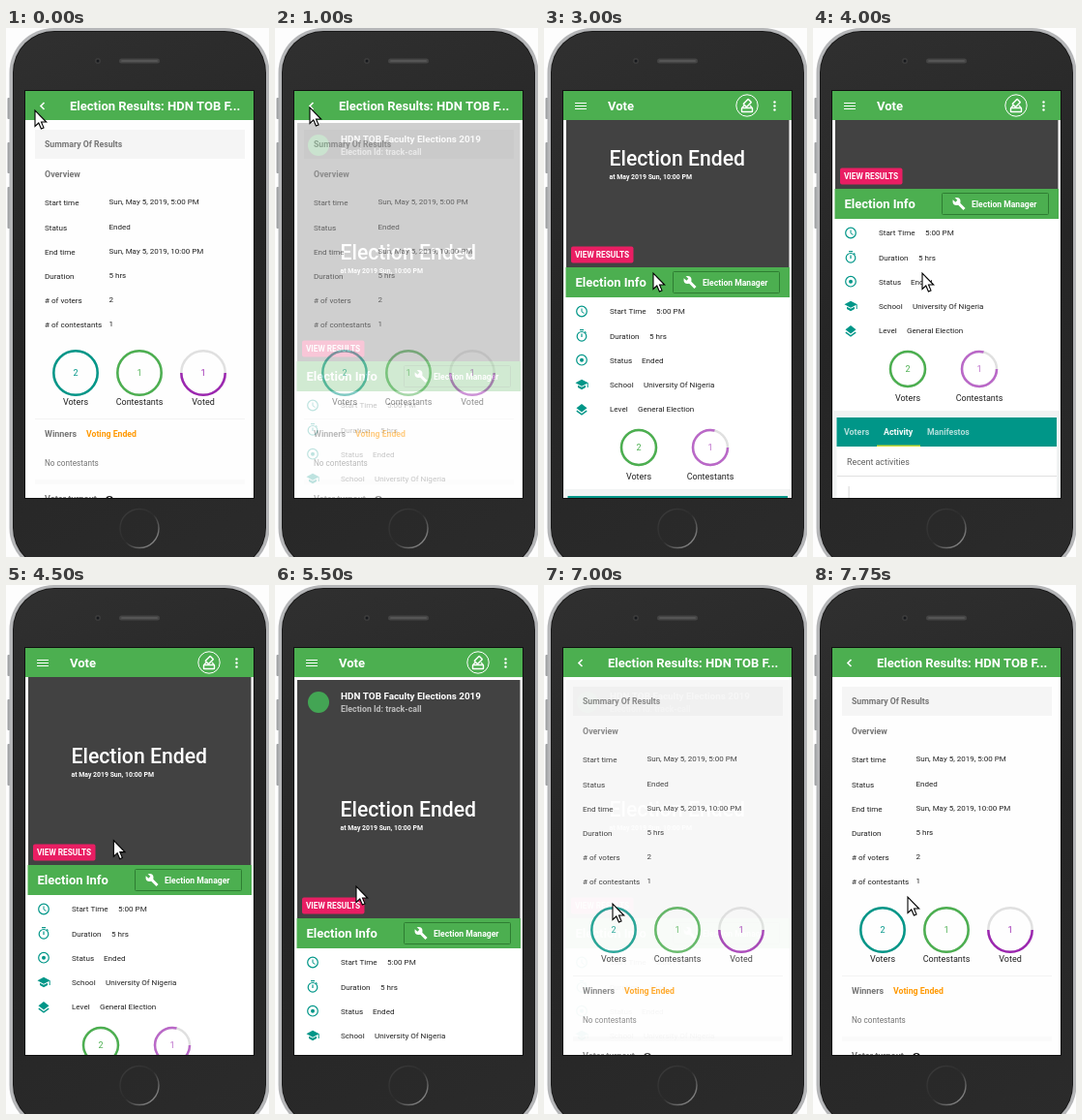
An HTML page with a canvas for the animation above (8 s loop, 272x546 px).

```html
<!DOCTYPE html>
<html lang="en">
<head>
<meta charset="utf-8">
<title>Election app</title>
<style>
  html, body { margin: 0; width: 100%; height: 100%; overflow: hidden; background: #fdfdfd; }
  canvas { display: block; width: 272px; height: 546px; }
</style>
</head>
<body>
<canvas id="stage"></canvas>
<script>
const W = 272, H = 546, LOOP = 8000, STEP = 250;
const GREEN = '#4caf50', TEAL = '#009688', GREY = '#757575', INK = '#212121';
const EVENT = 'HDN TOB Faculty Elections 2019';

const canvas = document.getElementById('stage');
const ctx = canvas.getContext('2d');
const ratio = window.devicePixelRatio || 1;
canvas.width = W * ratio;
canvas.height = H * ratio;

// Holds a copy of the page that is being faded out.
const under = document.createElement('canvas');
under.width = canvas.width;
under.height = canvas.height;

// Keyframes: [time, value, ...]
const CURSOR = [
  [0, 30, 85], [250, 33, 84], [500, 36, 82], [1000, 36, 82], [1250, 48, 130], [1500, 75, 210],
  [1750, 102, 282], [2000, 112, 301], [2500, 112, 301], [2750, 113, 262], [3000, 113, 253],
  [4250, 113, 253], [5000, 108, 285], [5500, 84, 311], [5750, 73, 325], [6000, 64, 333],
  [6500, 64, 333], [7000, 71, 329], [7250, 82, 326], [7750, 98, 322], [8000, 98, 322]
];
const SCROLL = [[0, 0], [2500, 0], [2750, 45], [3000, 97], [3250, 138], [3500, 166],
  [3750, 178], [4000, 178], [4250, 125], [4500, 55], [4750, 0], [8000, 0]];
const RESULTS = [[0, 1], [750, 1], [1000, 0.5], [1250, 0], [6500, 0], [6750, 0.4],
  [7000, 0.82], [7250, 1], [8000, 1]];

function track(keys, t) {
  const next = Math.max(1, keys.findIndex(k => k[0] >= t));
  const a = keys[next - 1], b = keys[next];
  const p = (t - a[0]) / (b[0] - a[0]);
  return a.slice(1).map((v, i) => v + (b[i + 1] - v) * p);
}

function rect(x, y, w, h, fill, radius = 0) {
  ctx.beginPath();
  ctx.roundRect(x, y, w, h, radius);
  ctx.fillStyle = fill;
  ctx.fill();
}

function outline(x, y, w, h, color, radius = 0, width = 1) {
  ctx.beginPath();
  ctx.roundRect(x, y, w, h, radius);
  ctx.strokeStyle = color;
  ctx.lineWidth = width;
  ctx.stroke();
}

function dot(x, y, r, fill) {
  ctx.beginPath();
  ctx.arc(x, y, r, 0, Math.PI * 2);
  ctx.fillStyle = fill;
  ctx.fill();
}

// Angles are in turns, clockwise from three o'clock.
function arc(x, y, r, color, width, from = 0, to = 1) {
  ctx.beginPath();
  ctx.arc(x, y, r, from * Math.PI * 2, to * Math.PI * 2);
  ctx.strokeStyle = color;
  ctx.lineWidth = width;
  ctx.stroke();
}

function line(points, color, width = 1) {
  ctx.beginPath();
  points.forEach(([x, y]) => ctx.lineTo(x, y));
  ctx.strokeStyle = color;
  ctx.lineWidth = width;
  ctx.stroke();
}

function shape(points, fill) {
  ctx.beginPath();
  points.forEach(([x, y]) => ctx.lineTo(x, y));
  ctx.closePath();
  ctx.fillStyle = fill;
  ctx.fill();
}

// y is the middle of the capital letters.
function text(str, x, y, size, color = INK, weight = 400, align = 'left') {
  ctx.font = `${weight} ${size}px Roboto, sans-serif`;
  ctx.textAlign = align;
  ctx.fillStyle = color;
  ctx.fillText(str, x, y + size * 0.36);
}

function ring(x, y, r, color, value, label, labelY, from = 0, to = 1) {
  arc(x, y, r, '#e0e0e0', 2.5);
  arc(x, y, r, color, 2.5, from, to);
  text(value, x, y, 9, color, 400, 'center');
  text(label, x, labelY, 9, INK, 400, 'center');
}

function drawPhone() {
  rect(0, 0, W, H, '#fdfdfd');
  [[72, 22], [118, 32], [164, 43]].forEach(([y, h]) => rect(1.5, y, 4, h, '#a0a2a4', 1));
  rect(3.5, 0, 269, 562, '#b4b5b7', 46);
  rect(7, 3, 262, 556, '#191919', 43);
  const body = ctx.createLinearGradient(0, 0, W, H);
  body.addColorStop(0, '#303030');
  body.addColorStop(0.5, '#252525');
  body.addColorStop(1, '#2b2b2b');
  rect(8, 4, 260, 554, body, 42);
  dot(95, 34, 3, '#3c3c3c');
  dot(95, 34, 1.5, '#16181c');
  rect(117, 31.5, 42, 5, '#454545', 2.5);
  rect(119, 33, 38, 2, '#555555', 1);
  const rim = ctx.createLinearGradient(120, 498, 156, 535);
  rim.addColorStop(0, '#3c3c3c');
  rim.addColorStop(0.5, '#2c2c2c');
  rim.addColorStop(1, '#999999');
  arc(138, 516.5, 20, rim, 1.4);
  rect(19, 64, 238, 422, '#111111');
}

function drawBar(title) {
  rect(20, 65, 236, 30, GREEN);
  text(title, 66, 80.5, 13, '#ffffff', 700);
}

function drawResultsBar() {
  drawBar(`Election Results: ${EVENT.slice(0, 9)}...`);
  line([[39.5, 77], [36, 80.5], [39.5, 84]], '#ffffff', 1.6);
}

function drawResults() {
  rect(20, 65, 236, 420, '#fefefe');
  drawResultsBar();
  rect(30, 105, 217, 30, '#f5f5f5');
  text('Summary Of Results', 40, 120, 8.7, GREY, 700);
  text('Overview', 40, 151, 8.9, GREY, 700);

  [['Start time', 'Sun, May 5, 2019, 5:00 PM'], ['Status', 'Ended'],
   ['End time', 'Sun, May 5, 2019, 10:00 PM'], ['Duration', '5 hrs'],
   ['# of voters', '2'], ['# of contestants', '1']].forEach(([label, value], i) => {
    const y = 180.5 + i * 25.2;
    text(label, 40, y, 8.1);
    text(value, 106.5, y - 1, 8);
  });

  ring(72, 356, 22.7, TEAL, '2', 'Voters', 386);
  ring(138, 356, 22.7, GREEN, '1', 'Contestants', 386);
  ring(204, 356, 22.7, '#9c27b0', '1', 'Voted', 386, 0, 0.5);

  line([[30, 403.5], [247, 403.5]], '#f3f3f3');
  text('Winners', 40, 419, 9, GREY, 700);
  text('Voting Ended', 83, 419, 8.7, '#ff9800', 700);
  text('No contestants', 40, 449.5, 8.2, GREY);
  rect(30, 466, 217, 5, '#fafafa');
  text('Voter turnout', 40, 486, 9, GREY, 700);
  dot(107, 487, 4, '#111111');
  text('?', 107, 486.5, 7, '#ffffff', 700, 'center');
}

const rowIcons = [
  y => {
    arc(39, y, 5.3, TEAL, 1.2);
    line([[39, y - 3], [39, y + 0.3], [41.5, y + 2]], TEAL);
  },
  y => {
    arc(39, y + 0.7, 4.8, TEAL, 1.2);
    line([[39, y - 2], [39, y + 1.3]], TEAL, 1.2);
    line([[37, y - 6], [41, y - 6]], TEAL, 1.2);
    line([[42.2, y - 4.2], [43.5, y - 3]], TEAL, 1.2);
  },
  y => {
    arc(39, y, 5.3, TEAL, 1.2);
    dot(39, y, 2, TEAL);
  },
  y => {
    shape([[32.5, y - 1.5], [39, y - 5], [45.7, y - 1.5], [39, y + 2]], TEAL);
    shape([[35, y + 1], [39, y + 3], [43, y + 1], [43, y + 3.2], [39, y + 5.4], [35, y + 3.2]], TEAL);
    line([[45.2, y - 1.5], [45.2, y + 3.2]], TEAL);
  },
  y => {
    shape([[33.5, y - 0.6], [39, y - 4.8], [44.5, y - 0.6], [39, y + 3.6]], TEAL);
    line([[33.8, y + 2.2], [39, y + 6], [44.2, y + 2.2]], TEAL, 1.4);
  }
];

function drawWrench(x, y) {
  line([[x - 1, y - 1], [x + 5.5, y + 5.5]], '#ffffff', 3);
  dot(x - 2.5, y - 2.5, 4, '#ffffff');
  shape([[x - 7, y - 5], [x - 5, y - 7], [x - 1.7, y - 3.7], [x - 3.7, y - 1.7]], GREEN);
}

function drawVoteContent() {
  rect(21, 96, 234, 477, '#ffffff');
  rect(23, 98, 230.5, 246, '#424242');
  dot(45, 121, 11, '#43a554');
  text(EVENT, 68, 114, 9.9, '#ffffff', 700);
  text('Election Id: track-call', 68, 128, 8.8, '#bdbdbd', 700);
  text('Election Ended', 67.5, 231, 21.2, '#ffffff', 500);
  text('at May 2019 Sun, 10:00 PM', 67.5, 251, 6.9, '#ffffff', 700);
  rect(28, 322.5, 64.5, 17, '#e91e63', 2);
  text('VIEW RESULTS', 60, 331.2, 8.3, '#ffffff', 700, 'center');

  rect(22.5, 344, 231.5, 31, GREEN);
  text('Election Info', 32.5, 359.5, 13, '#ffffff', 700);
  outline(133.5, 348.5, 110, 22, '#2e7d32', 1);
  drawWrench(151, 359.5);
  text('Election Manager', 164, 360, 8.6, '#ffffff', 700);

  [['Start Time', '5:00 PM', 116], ['Duration', '5 hrs', 109], ['Status', 'Ended', 101],
   ['School', 'University Of Nigeria', 103], ['Level', 'General Election', 97]]
    .forEach(([label, value, x], i) => {
      const y = 389.5 + i * 25.1;
      rowIcons[i](y);
      text(label, 68, y, 8.1);
      text(value, x, y, 8.1);
    });

  ring(98, 530, 18, GREEN, '2', 'Voters', 560);
  ring(172, 530, 18, '#ba68c8', '1', 'Contestants', 560, 0, 0.79);

  rect(24.5, 580, 227.5, 200, '#ffffff');
  rect(24.5, 580, 227.5, 30, TEAL);
  text('Voters', 32, 595, 8.9, '#b2dfdb', 700);
  text('Activity', 73, 595, 8.9, '#ffffff', 700);
  text('Manifestos', 118, 595, 8.7, '#b2dfdb', 700);
  rect(66, 608.5, 45, 1.5, '#cddc39');
  text('Recent activities', 35, 626, 8.9, '#616161');
  line([[25, 640.5], [252, 640.5]], '#e0e0e0');
  rect(36.5, 651, 1.3, 60, '#e0e0e0');
}

function drawVote(scroll) {
  rect(20, 65, 236, 420, '#f1f3f3');
  ctx.save();
  ctx.translate(0, -scroll);
  drawVoteContent();
  ctx.restore();
  drawBar('Vote');
  [77, 80, 83].forEach(y => rect(32, y, 12, 1, '#ffffff'));
  arc(210, 80, 11.2, '#ffffff', 1);
  outline(204.5, 82.5, 11, 4, '#ffffff', 0.5, 1.4);
  line([[205, 82], [207, 80]], '#ffffff', 1.3);
  line([[215, 82], [213, 80]], '#ffffff', 1.3);
  ctx.save();
  ctx.translate(210.3, 77.5);
  ctx.rotate(Math.PI / 4);
  outline(-2.3, -3.5, 4.6, 7, '#ffffff', 0.5, 1.5);
  ctx.restore();
  [76.5, 80.5, 84.5].forEach(y => dot(238.5, y, 1.2, '#ffffff'));
}

// The old page washes out to white while the new one appears.
function fadeToResults(alpha) {
  ctx.globalAlpha = alpha;
  rect(20, 65, 236, 420, '#ffffff');
  ctx.globalAlpha = 1;
  const layer = under.getContext('2d');
  layer.clearRect(0, 0, under.width, under.height);
  layer.drawImage(canvas, 0, 0);
  drawResults();
  ctx.globalAlpha = 1 - alpha;
  ctx.drawImage(under, 0, 0, W, H);
  ctx.globalAlpha = 1;
  drawResultsBar();
}

function drawCursor(x, y) {
  const points = [[0, 0], [0, 16.5], [3.8, 13], [6.4, 19], [9, 17.9], [6.5, 12], [11.7, 12]]
    .map(([dx, dy]) => [x + dx, y + dy]);
  shape(points, '#ffffff');
  line([...points, points[0], points[1]], '#000000', 1.1);
}

function draw(t) {
  ctx.setTransform(ratio, 0, 0, ratio, 0, 0);
  drawPhone();
  const [alpha] = track(RESULTS, t);
  ctx.save();
  ctx.beginPath();
  ctx.rect(20, 65, 236, 420);
  ctx.clip();
  if (alpha === 1) {
    drawResults();
  } else {
    drawVote(track(SCROLL, t)[0]);
    if (alpha > 0) fadeToResults(alpha);
  }
  ctx.restore();
  drawCursor(...track(CURSOR, t));
}

const start = performance.now();
function tick() {
  const t = (performance.now() - start) % LOOP;
  draw(Math.floor(t / STEP) * STEP);
  requestAnimationFrame(tick);
}
tick();
</script>
</body>
</html>
```
